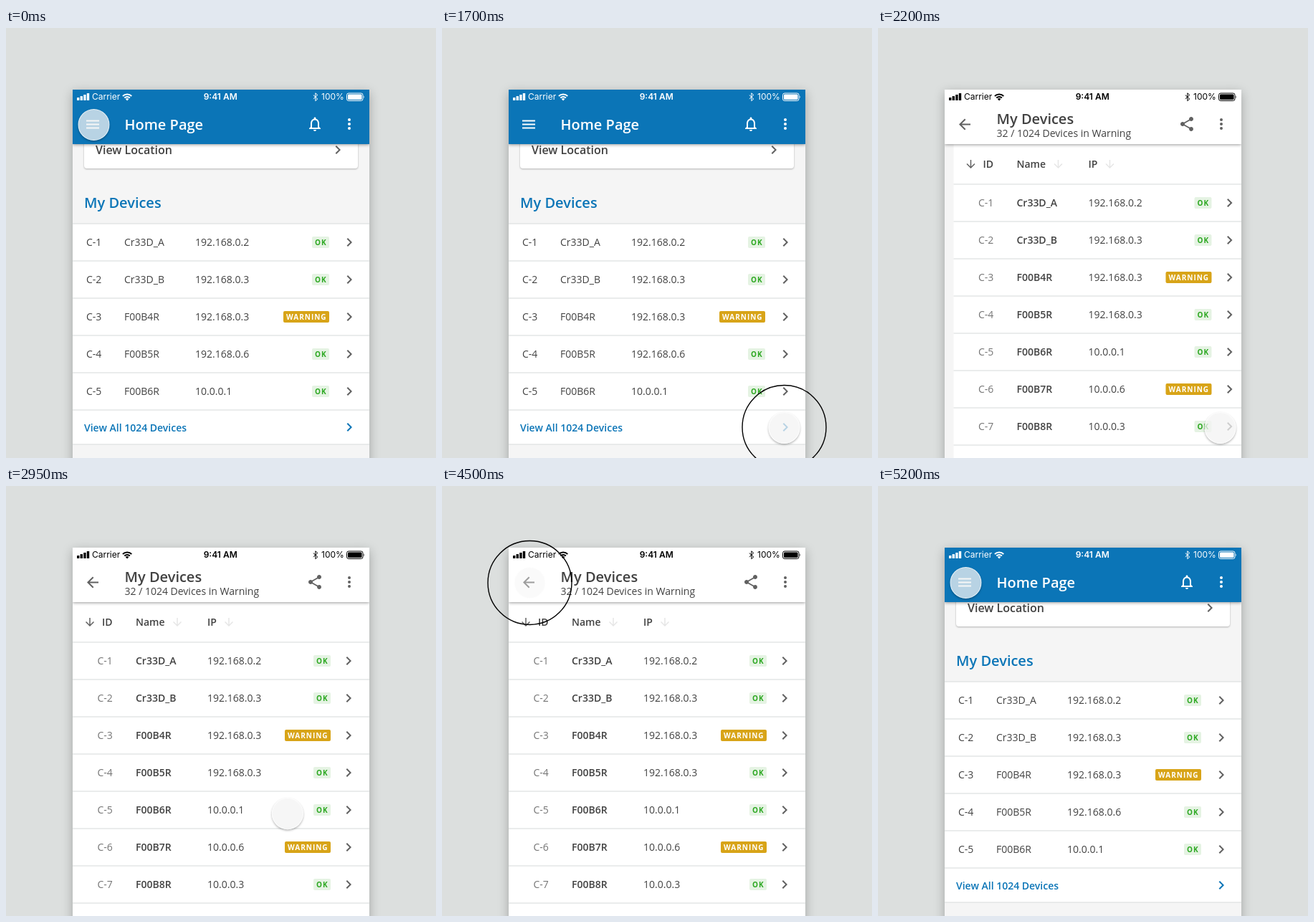
These frames come from a looping animation (600 by 600 pixels, 5.3 s). An HTML page:

```html
<!DOCTYPE html>
<html lang="en">
<head>
<meta charset="utf-8">
<title>Device list navigation</title>
<style>
  html, body { margin: 0; width: 100%; height: 100%; overflow: hidden; background: #dcdfde; }
  #stage { position: absolute; left: 0; top: 0; width: 600px; height: 600px; overflow: hidden; }
  svg { position: absolute; left: 0; top: 0; }
  text { font-family: "Open Sans", sans-serif; font-size: 14px; fill: #424242; white-space: pre; }
  .semi { font-weight: 600; }
  .title { font-weight: 600; font-size: 20px; }
  .badge { font-weight: 700; font-size: 10px; letter-spacing: 1px; }
  .status text { font-family: Inter, sans-serif; font-size: 12px; fill: currentColor; }
  .status .clock { font-weight: 600; }
  .phone { position: absolute; left: 93px; top: 86px; width: 414px; height: 560px;
    background: #f5f5f5; box-shadow: 0 4px 14px rgba(0, 0, 0, .27); }
  .bar { filter: drop-shadow(0 1px 2px rgba(0, 0, 0, .4)); }
  .card { filter: drop-shadow(0 1px 1px rgba(0, 0, 0, .28)); }
  #cursor { position: absolute; left: -22.5px; top: -22.5px; width: 42px; height: 42px;
    border: 1.5px solid rgba(255, 255, 255, .65); border-radius: 50%;
    background: rgba(243, 243, 243, .75); }
</style>
</head>
<body>
<div id="stage">
  <div class="phone"></div>
  <svg id="scene" width="600" height="600" viewBox="0 0 600 600"></svg>
  <div id="cursor"></div>
</div>
<script>
const LOOP = 5300, STEP = 50, WIDTH = 414;
const BLUE = '#0b75b7', GREY = '#616161';
const MENU = { x: 122.5, y: 135 }, MORE = { x: 477.5, y: 558 };

const ICON = {
  chevron: 'M10 6 8.59 7.41 13.17 12l-4.58 4.59L10 18l6-6z',
  menu: 'M3 18h18v-2H3v2zm0-5h18v-2H3v2zm0-7v2h18V6H3z',
  back: 'M20 11H7.83l5.59-5.59L12 4l-8 8 8 8 1.41-1.41L7.83 13H20v-2z',
  down: 'M20 12l-1.41-1.41L13 16.17V4h-2v12.17l-5.58-5.59L4 12l8 8 8-8z',
  bell: 'M12 22c1.1 0 2-.9 2-2h-4c0 1.1.9 2 2 2zm6-6v-5c0-3.07-1.63-5.64-4.5-6.32V4c0-.83-.67-1.5-1.5-1.5s-1.5.67-1.5 1.5v.68C7.64 5.36 6 7.92 6 11v5l-2 2v1h16v-1l-2-2zm-2 1H8v-6c0-2.48 1.51-4.5 4-4.5s4 2.02 4 4.5v6z',
  share: 'M18 16.08c-.76 0-1.44.3-1.96.77L8.91 12.7c.05-.23.09-.46.09-.7s-.04-.47-.09-.7l7.05-4.11c.54.5 1.25.81 2.04.81 1.66 0 3-1.34 3-3s-1.34-3-3-3-3 1.34-3 3c0 .24.04.47.09.7L8.04 9.81C7.5 9.31 6.79 9 6 9c-1.66 0-3 1.34-3 3s1.34 3 3 3c.79 0 1.5-.31 2.04-.81l7.12 4.16c-.05.21-.08.43-.08.65 0 1.61 1.31 2.92 2.92 2.92s2.92-1.31 2.92-2.92-1.31-2.92-2.92-2.92z',
  dots: 'M12 8a2 2 0 1 0 0-4 2 2 0 0 0 0 4zm0 2a2 2 0 1 0 0 4 2 2 0 0 0 0-4zm0 6a2 2 0 1 0 0 4 2 2 0 0 0 0-4z'
};

const icon = (name, x, y, fill, size = 1) =>
  `<path d="${ICON[name]}" fill="${fill}" transform="translate(${x} ${y}) scale(${size}) translate(-12 -12)"/>`;
const text = (x, y, str, cls = '', fill = '') =>
  `<text x="${x}" y="${y}" class="${cls}"${fill && ` style="fill:${fill}"`}>${str}</text>`;
const rect = (x, y, w, h, fill, r = 0) =>
  `<rect x="${x}" y="${y}" width="${w}" height="${h}" rx="${r}" fill="${fill}"/>`;
const rule = y => rect(93, y - .75, WIDTH, 1.5, '#e4e6e6');

// Badge with its right edge at x, centred on y
function badge(x, y, warn) {
  const w = warn ? 64 : 24;
  return rect(x - w, y - 8, w, 16, warn ? '#d8a418' : '#e5f3e3', 2) +
    text(x - w + 4, y + 3.8, warn ? 'WARNING' : 'OK', 'badge', warn ? '#fff' : '#2aa71f');
}

function status(color) {
  const bars = [0, 1, 2, 3].map(i =>
    rect(99 + i * 4.6, 97 - i * 2, 3.4, 4 + i * 2, 'currentColor', .6)).join('');
  return `<g class="status" style="color:${color}">${bars}
    ${text(120, 100.4, 'Carrier')}
    <g fill="none" stroke="currentColor" stroke-width="2">
      <path d="M162.9 95a9 9 0 0 1 12.4 0M165.3 97.6a5.6 5.6 0 0 1 7.6 0"/></g>
    <path d="M169.1 101.6l-2.3-2.5a3.4 3.4 0 0 1 4.6 0z" fill="currentColor"/>
    ${text(275.7, 100.4, '9:41 AM', 'clock')}
    <path d="M428.8 93.6l6 5.4-3 2.7V90.8l3 2.7-6 5.4" fill="none" stroke="currentColor" stroke-width="1"/>
    ${text(440, 100.4, '100%')}
    <rect x="475.5" y="91" width="22.5" height="10.5" rx="2.6" fill="none" stroke="currentColor"/>
    ${rect(477, 92.5, 19.5, 7.5, 'currentColor', 1.3)}
    <path d="M499 94.5q1.6 1.7 0 3.5z" fill="currentColor"/></g>`;
}

const homeRows = [
  ['Cr33D_A', '192.168.0.2'], ['Cr33D_B', '192.168.0.3'], ['F00B4R', '192.168.0.3', 1],
  ['F00B5R', '192.168.0.6'], ['F00B6R', '10.0.0.1']
];
const listRows = [
  ['Cr33D_A', '192.168.0.2'], ['Cr33D_B', '192.168.0.3'], ['F00B4R', '192.168.0.3', 1],
  ['F00B5R', '192.168.0.3'], ['F00B6R', '10.0.0.1'], ['F00B7R', '10.0.0.6', 1], ['F00B8R', '10.0.0.3']
];

function homePage() {
  const rows = homeRows.map(([name, ip, warn], i) => {
    const y = 299 + i * 52;
    return text(112, y + 5, 'C-' + (i + 1)) + text(165, y + 5, name) + text(264, y + 5, ip) +
      badge(451, y, warn) + icon('chevron', 479, y, GREY) + rule(y + 26);
  }).join('');
  return `<g class="card">${rect(109, 120, 382, 76, '#fff', 4)}</g>` +
    text(125, 176, 'View Location', 'semi" style="font-size:16px') + icon('chevron', 463, 170, GREY) +
    text(109, 251, 'My Devices', 'title', BLUE) +
    rect(93, 273, WIDTH, 308, '#fff') + rule(273) + rows + rule(581) +
    text(109, 563, 'View All 1024 Devices', 'semi', BLUE) + icon('chevron', 479, 557, BLUE);
}

function listPage() {
  const rows = listRows.map(([name, ip, warn], i) => {
    const y = 244 + i * 52;
    return text(127.5, y + 5, 'C-' + (i + 1), '', '#757575') + text(181, y + 5, name, 'semi') +
      text(281, y + 5, ip) + badge(453, y, warn) + icon('chevron', 478, y, GREY) + rule(y + 26);
  }).join('');
  return rect(93, 162, WIDTH, 440, '#fff') + icon('down', 117, 190, GREY, .75) +
    text(134, 195, 'ID', 'semi') + text(181, 195, 'Name', 'semi') + text(281, 195, 'IP', 'semi') +
    icon('down', 239, 190, '#e6e6e6', .75) + icon('down', 311, 190, '#e6e6e6', .75) + rule(218) + rows;
}

document.getElementById('scene').innerHTML = `
  <clipPath id="screen"><rect x="93" y="86" width="${WIDTH}" height="514"/></clipPath>
  <g clip-path="url(#screen)">
    <g id="home">${homePage()}</g>
    <g id="list">${listPage()}</g>
    <g class="bar">${rect(93, 86, WIDTH, 76, BLUE)}</g>
    ${status('#fff')}
    ${icon('menu', 121, 134.5, '#fff')}
    <g id="homeTitle">${text(165.5, 142, 'Home Page', 'title', '#fff')}</g>
    ${icon('bell', 431, 134, '#fff')}${icon('dots', 479, 134, '#fff')}
    <g id="listBar">
      ${rect(93, 86, WIDTH, 76, '#fff')}${status('#000')}
      ${icon('back', 121, 134.5, GREY)}
      <g id="listTitle">${text(165.5, 134, 'My Devices', 'title')}
        ${text(165.5, 151.5, '32 / 1024 Devices in Warning')}</g>
      ${icon('share', 431, 134, GREY)}${icon('dots', 479, 134, GREY)}
    </g>
  </g>
  <circle id="ring" fill="none" stroke="#000" stroke-width="1.4"/>`;

const el = id => document.getElementById(id);
const [home, list, homeTitle, listBar, listTitle, ring, cursor] =
  ['home', 'list', 'homeTitle', 'listBar', 'listTitle', 'ring', 'cursor'].map(el);

const span = (t, a, b) => Math.min(1, Math.max(0, (t - a) / (b - a)));
const ease = (t, a, b) => .5 - .5 * Math.cos(Math.PI * span(t, a, b));
const shift = (node, x, y) => node.setAttribute('transform', `translate(${x.toFixed(2)} ${y.toFixed(2)})`);

const OPEN = 1700, CLOSE = 4500;

function draw(t) {
  const closing = t >= CLOSE;
  const dt = t - (closing ? CLOSE : OPEN);
  const enter = ease(dt, 100, 550);
  const leave = ease(dt, 50, closing ? 440 : 370);
  const fade = ease(dt, 100, 510);

  shift(home, -WIDTH * (closing ? 1 - enter : leave), 0);
  shift(list, WIDTH * (closing ? leave : 1 - enter), 0);

  const white = closing ? 1 - fade : fade;
  listBar.setAttribute('opacity', white);
  shift(homeTitle, 0, -8 * white);
  shift(listTitle, 0, 8 * (1 - white));

  const tap = closing ? MENU : MORE;
  const press = span(dt, 0, 250);
  ring.setAttribute('cx', tap.x);
  ring.setAttribute('cy', tap.y - (closing ? 0 : 1));
  ring.setAttribute('r', 58.5 - 36.5 * ease(dt, 0, 250));
  ring.setAttribute('visibility', dt >= 0 && press < 1 ? 'visible' : 'hidden');

  const go = ease(t, 80, 920) - ease(t, 2700, 3470);
  const x = MENU.x + (MORE.x - MENU.x) * go;
  const y = MENU.y + (MORE.y - MENU.y) * go;
  const soft = span(t, 3450, 3700) - span(t, CLOSE, CLOSE + 150);
  cursor.style.transform = `translate(${x}px, ${y}px)`;
  cursor.style.opacity = 1 - .45 * soft;
  cursor.style.boxShadow = `0 1.5px 3px rgba(0, 0, 0, ${.3 * (1 - soft)})`;
}

const start = performance.now();
function tick() {
  const t = (performance.now() - start) % LOOP;
  draw(Math.floor(t / STEP) * STEP);
  requestAnimationFrame(tick);
}
tick();
</script>
</body>
</html>
```
